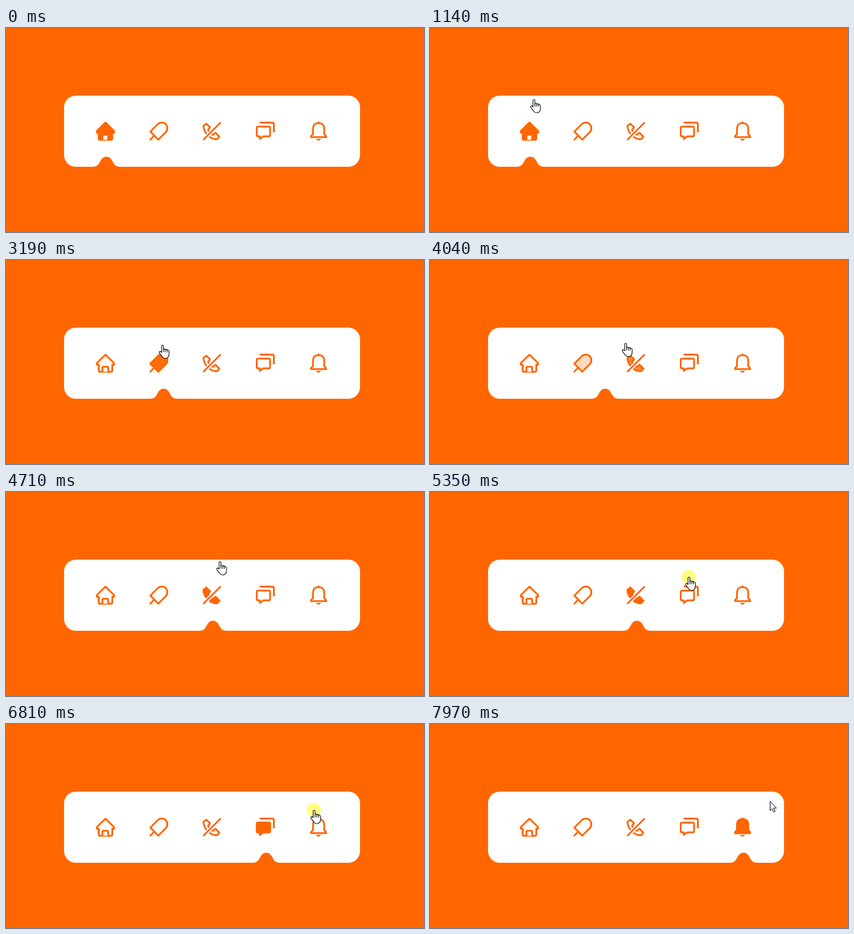
Write an HTML page that moves like this. It is 706 px wide and 344 px high and loops after 8 s.

```html
<!DOCTYPE html>
<html lang="en">
<head>
<meta charset="utf-8">
<title>Tab bar</title>
<style>
html, body { margin: 0; width: 100%; height: 100%; overflow: hidden; background: #f60; }
svg { display: block; width: 706px; height: 344px; }

.icon { fill: none; stroke: #f60; stroke-width: 3; }
.fill { fill: #f60; }
.solid { fill: #f60; stroke: none; }

/* One shared 8 s clock */
.notch, .fill, .x, .y, .hand, .arrow, .click { animation: 8s linear infinite; }

/* Notch: springs past the next tab on each click */
.notch { animation-name: notch; animation-timing-function: cubic-bezier(.68, -.55, .265, 1.55); }
@keyframes notch {
  0%, 35.44% { transform: translate(169.5px, 217px); }
  41.69%, 47.63% { transform: translate(259.5px, 217px); }
  53.88%, 67.63% { transform: translate(349.5px, 217px); }
  73.88%, 85.94% { transform: translate(439.5px, 217px); }
  92.19%, 100% { transform: translate(529.5px, 217px); }
}

/* Icon fills cross-fade */
.fill { animation-timing-function: ease; }
.home { animation-name: home; }
.tag { animation-name: tag; }
.phone { animation-name: phone; }
.chat { animation-name: chat; }
.bell { animation-name: bell; }
@keyframes home { 0%, 35.44% { opacity: 1; } 41.69%, 100% { opacity: 0; } }
@keyframes tag { 0%, 35.44%, 53.88%, 100% { opacity: 0; } 41.69%, 47.63% { opacity: 1; } }
@keyframes phone { 0%, 47.63%, 73.88%, 100% { opacity: 0; } 53.88%, 67.63% { opacity: 1; } }
@keyframes chat { 0%, 67.63%, 92.19%, 100% { opacity: 0; } 73.88%, 85.94% { opacity: 1; } }
@keyframes bell { 0%, 85.94% { opacity: 0; } 92.19%, 100% { opacity: 1; } }

/* Pointer: x and y run apart so the hops become arcs */
.x { animation-name: x; }
.y { animation-name: y; }
@keyframes x {
  0%, 7.9% { transform: translateX(146px); }
  13.75% { transform: translateX(177px); }
  16.25%, 18.6% { transform: translateX(168px); }
  21%, 25% { transform: translateX(172px); animation-timing-function: ease-in; }
  28% { transform: translateX(240px); animation-timing-function: ease-out; }
  31.75%, 41.7% { transform: translateX(264px); animation-timing-function: ease-in-out; }
  46%, 56.6% { transform: translateX(330px); animation-timing-function: ease-in; }
  58.88% { transform: translateX(361px); }
  60.6% { transform: translateX(390px); animation-timing-function: ease-out; }
  65.25%, 72.25% { transform: translateX(437px); }
  72.63% { transform: translateX(443px); }
  75% { transform: translateX(462px); }
  76.75% { transform: translateX(475px); }
  78.75% { transform: translateX(490px); animation-timing-function: ease-out; }
  82.6%, 95.9% { transform: translateX(520px); animation-timing-function: ease-in-out; }
  99.6%, 100% { transform: translateX(574px); }
}
@keyframes y {
  0%, 7.9% { transform: translateY(-22px); }
  13.75% { transform: translateY(110px); animation-timing-function: ease-out; }
  16.25% { transform: translateY(142px); }
  17.75%, 18.6% { transform: translateY(132px); }
  21%, 25% { transform: translateY(143px); animation-timing-function: ease-out; }
  28% { transform: translateY(115px); animation-timing-function: ease-in-out; }
  31.75%, 41.7% { transform: translateY(143px); animation-timing-function: ease-out; }
  43.8% { transform: translateY(122px); animation-timing-function: ease-in; }
  46%, 56.6% { transform: translateY(140px); animation-timing-function: ease-out; }
  58.88% { transform: translateY(117px); }
  60.6% { transform: translateY(114px); animation-timing-function: ease-in-out; }
  65.25%, 72.25% { transform: translateY(143px); }
  72.63% { transform: translateY(140px); animation-timing-function: ease-out; }
  75% { transform: translateY(120px); }
  76.75% { transform: translateY(117px); }
  78.75% { transform: translateY(115px); animation-timing-function: ease-in-out; }
  82.6%, 95.9% { transform: translateY(145px); animation-timing-function: ease-in-out; }
  99.6%, 100% { transform: translateY(130px); }
}

/* Hard switches */
.hand, .arrow, .click { animation-timing-function: step-end; }
.hand { animation-name: hand; }
.arrow { animation-name: arrow; }
.click { animation-name: click; }
@keyframes hand { 0%, 99.25%, 100% { opacity: 0; } 13.95% { opacity: 1; } }
@keyframes arrow { 0%, 99.25%, 100% { opacity: 1; } 13.95% { opacity: 0; } }
@keyframes click {
  0%, 36%, 47.63%, 67.63%, 86%, 100% { opacity: 0; }
  34.25%, 46.5%, 66.87%, 85.12% { opacity: 1; }
}
</style>
</head>
<body>
<svg viewBox="0 0 706 344">
  <defs>
    <path id="home" d="M168 159.6 153.5 173.8V176.5H156.5V186Q156.5 188.5 159 188.5H177Q179.5 188.5 179.5 186V176.5H182.5V173.8Z"/>
    <path id="tag" d="M243.8 174.7 256.3 162.2A9.5 9.5 0 0 1 269.8 175.7L257.3 188.2Z"/>
    <path id="phone" d="M338.3 161.3 344.6 167.5 341.3 171.8Q344 177.5 349.3 180.2L354 176.8 360.4 183.2 356.6 187.4Q348.5 188.4 341 181Q333.2 173 333.6 165.2Z"/>
    <path id="chat" d="M425.5 166.2H444Q446 166.2 446 168.2V180.7Q446 182.7 444 182.7H434.7L428.7 187V182.7H425.5Q423.5 182.7 423.5 180.7V168.2Q423.5 166.2 425.5 166.2Z"/>
    <path id="bell" d="M515.3 184V182.2L518.6 178.8V169.5C518.6 163.6 522.6 160.2 528 160.2S537.4 163.6 537.4 169.5V178.8L540.7 182.2V184Z"/>
  </defs>

  <rect width="706" height="344" fill="#f60"/>
  <rect x="98" y="114" width="500" height="120" rx="20" fill="#fff"/>
  <path class="notch" fill="#f60" d="M-23 18V17C-16 17-13 13-10.5 8C-8 3-5 0 0 0S8 3 10.5 8C13 13 16 17 23 17V18Z"/>

  <g class="icon" stroke-linejoin="round">
    <use href="#home" class="fill home"/>
    <use href="#home"/>
    <path d="M163 188.5V181.5Q163 180 164.5 180H171Q172.5 180 172.5 181.5V188.5" fill="#fff"/>
  </g>

  <g class="icon">
    <use href="#tag" class="fill tag"/>
    <use href="#tag"/>
    <path d="M250.5 181.5 243 189"/>
  </g>

  <g class="icon">
    <use href="#phone" class="fill phone"/>
    <use href="#phone" stroke-linejoin="round"/>
    <path d="M333 189 363 159" stroke="#fff" stroke-width="6.5"/>
    <path d="M333 188.8 362.6 159.2"/>
  </g>

  <g class="icon" stroke-linejoin="round">
    <path d="M428.5 159.6H449.5Q452.4 159.6 452.4 162.5V176"/>
    <use href="#chat" class="fill chat"/>
    <use href="#chat"/>
  </g>

  <g class="icon" stroke-linejoin="round">
    <use href="#bell" class="fill bell"/>
    <use href="#bell"/>
    <path class="solid" d="M526 159.5Q526.5 157.6 528 157.6T530 159.5ZM523.8 187H532.2Q530.5 190 528 190T523.8 187Z"/>
  </g>

  <g class="x"><g class="y">
    <circle class="click" r="12" fill="#ffff80"/>
    <path class="arrow" fill="#fff" stroke="#000" d="M.5 .5V16.2L4 12.8 6.6 18.6 9 17.5 6.4 11.8H11.2Z"/>
    <g class="hand" stroke="#000" stroke-width="1.1" stroke-linejoin="round">
      <path fill="#fff" d="M-1.2 2Q-1.2 .5 .4 .5T2 2V8Q2 6.8 3.5 6.8T5 8.4Q5.2 7.5 6.6 7.6T8 9.2Q8.5 8.5 9.6 8.7Q11.4 9 11.4 11V15.5Q11.4 19 9.8 20.8Q8 23 5 23Q1.8 23 .4 20.8L-4.4 14.6Q-5.8 12.4-4.7 11.4Q-3.2 10.4-1.2 13Z"/>
      <path fill="none" d="M2 8V12.5M5 8.4V12.5M8 9.2V12.8"/>
    </g>
  </g></g>
</svg>
</body>
</html>
```
